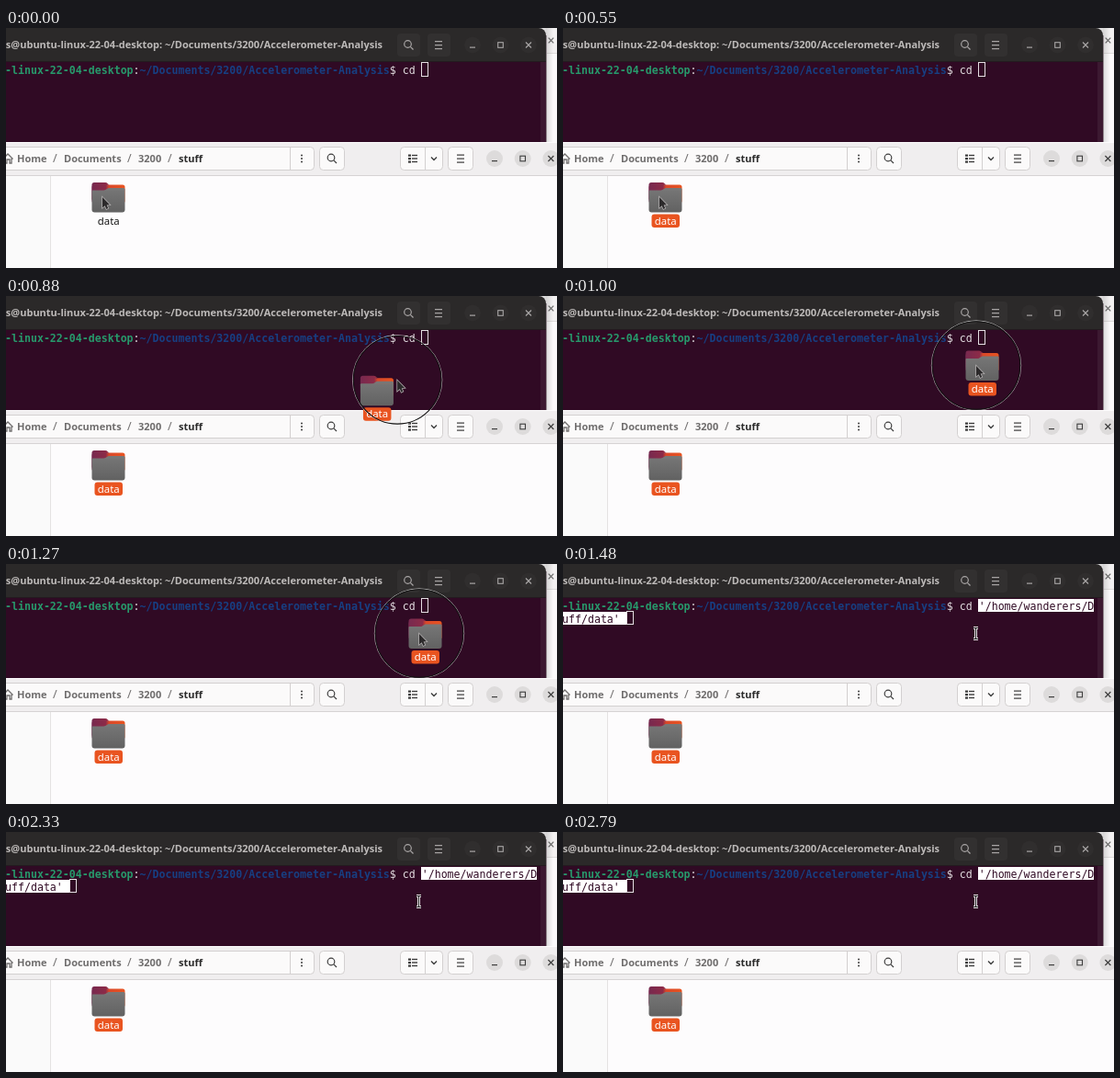
Write an HTML page with a canvas that moves like this. It is 600 by 261 pixels and loops after 2.82 s.

```html
<!DOCTYPE html>
<html lang="en">
<head>
<meta charset="utf-8">
<title>Drag a folder into the terminal</title>
<style>
html, body { margin: 0; width: 100%; height: 100%; overflow: hidden; background: #fff; }
canvas { display: block; width: 600px; height: 261px; }
</style>
</head>
<body>
<canvas id="stage" width="600" height="261"></canvas>
<script>
const ctx = document.getElementById('stage').getContext('2d');
const LOOP = 2820;
const UI = '"Noto Sans", "Open Sans", sans-serif';
const MONO = '11.6px "DejaVu Sans Mono", "Noto Sans Mono", monospace';
const CELL = 6.98;
const CLICK = 210, RELEASE = 420, PRESS = 578, DRAG = 630, DROP = 1480;
const LAG = 31;

function rect(x, y, w, h, fill) {
  ctx.fillStyle = fill;
  ctx.fillRect(x, y, w, h);
}

function box(x, y, w, h, r, fill, stroke) {
  ctx.beginPath();
  ctx.roundRect(x, y, w, h, r);
  if (fill) { ctx.fillStyle = fill; ctx.fill(); }
  if (stroke) { ctx.strokeStyle = stroke; ctx.lineWidth = 1; ctx.stroke(); }
}

function disc(x, y, r, fill) {
  ctx.beginPath();
  ctx.arc(x, y, r, 0, Math.PI * 2);
  ctx.fillStyle = fill;
  ctx.fill();
}

function circle(x, y, r, color, width) {
  ctx.beginPath();
  ctx.arc(x, y, r, 0, Math.PI * 2);
  ctx.strokeStyle = color;
  ctx.lineWidth = width;
  ctx.stroke();
}

function lines(color, width, ...paths) {
  ctx.strokeStyle = color;
  ctx.lineWidth = width;
  ctx.beginPath();
  for (const p of paths) {
    ctx.moveTo(p[0], p[1]);
    for (let i = 2; i < p.length; i += 2) ctx.lineTo(p[i], p[i + 1]);
  }
  ctx.stroke();
}

function shape(points, fill, stroke) {
  ctx.beginPath();
  for (let i = 0; i < points.length; i += 2) ctx.lineTo(points[i], points[i + 1]);
  ctx.closePath();
  if (stroke) { ctx.strokeStyle = stroke; ctx.lineWidth = 1.5; ctx.stroke(); }
  ctx.fillStyle = fill;
  ctx.fill();
}

function text(str, x, y, font, color, align = 'left') {
  ctx.font = font;
  ctx.fillStyle = color;
  ctx.textAlign = align;
  ctx.fillText(str, x, y);
}

function lens(x, y, color) {
  circle(x - 1, y - 1, 3.8, color, 1.2);
  lines(color, 1.2, [x + 1.8, y + 1.8, x + 5, y + 5]);
}

function burger(x, y, color) {
  for (const d of [-4, 0, 4]) rect(x - 4, y + d - 0.5, 8, 1.2, color);
}

function cross(x, y, r, color) {
  lines(color, 1.2, [x - r, y - r, x + r, y + r], [x + r, y - r, x - r, y + r]);
}

function windowButtons(x, y, step, fill, color) {
  for (let i = 0; i < 3; i++) disc(x + i * step, y, 9, fill);
  rect(x - 3, y + 2, 6, 1.2, color);
  ctx.strokeStyle = color;
  ctx.lineWidth = 1.1;
  ctx.strokeRect(x + step - 2.8, y - 2.8, 5.6, 5.6);
  cross(x + step * 2, y, 3, color);
}

function backdrop() {
  rect(0, 0, 600, 261, '#fbfafb');
  rect(588, 0, 12, 27, '#f3f1f2');
  rect(588, 27, 12, 1, '#dedcdc');
  cross(593.5, 13.5, 2.8, '#666');
  const shade = ctx.createLinearGradient(588, 0, 596, 0);
  shade.addColorStop(0, 'rgba(0,0,0,.13)');
  shade.addColorStop(1, 'rgba(0,0,0,0)');
  rect(580, 0, 16, 125, shade);
}

function terminal(pasted) {
  rect(0, 30, 588, 96, '#300a24');
  rect(582, 37, 6, 88, '#3c1931');
  box(-10, 0, 598, 36, [0, 8, 0, 0], '#2b2929');
  rect(0, 36, 588, 1, '#231b1f');
  rect(588, 8, 1, 116, '#8f858b');
  text('s@ubuntu-linux-22-04-desktop: ~/Documents/3200/Accelerometer-Analysis',
    410, 22, 'bold 11px ' + UI, '#bdbab9', 'right');
  box(426, 6, 25, 25, 4, '#323030');
  box(459, 6, 25, 25, 4, '#323030');
  const icon = '#a9a6a6';
  lens(438.5, 18.5, icon);
  burger(471, 18.5, icon);
  windowButtons(508, 18.5, 30.5, '#302e2e', icon);

  const put = (str, col, y, color, weight = '') =>
    text(str, -1 + col * CELL, y, weight + MONO, color);
  put('-linux-22-04-desktop', 0, 49.5, '#27996b', 'bold ');
  put(':', 20, 49.5, '#e4dfe2');
  put('~/Documents/3200/Accelerometer-Analysis', 21, 49.5, '#173f82', 'bold ');
  put('$ cd', 60, 49.5, '#e4dfe2');

  if (pasted) {
    rect(452, 38, 126, 14, '#fff');
    rect(0, 52, 69, 14, '#fff');
    put("'/home/wanderers/D", 65, 49.5, '#300a24');
    put("uff/data'", 0, 63.5, '#300a24');
  }
  ctx.strokeStyle = '#e4dfe2';
  ctx.lineWidth = 1;
  if (pasted) ctx.strokeRect(69.5, 51.5, 7, 14);
  else ctx.strokeRect(452.5, 37.5, 7, 15);
}

function files() {
  rect(0, 124, 600, 137, '#fdfcfd');
  rect(0, 125, 600, 35, '#f0eeef');
  rect(0, 160, 600, 1, '#d6d3d4');
  rect(0, 161, 48, 100, '#fafafa');
  rect(48, 161, 1, 100, '#e4e2e2');

  const line = '#d3d0d0', ink = '#3d3d3d', dim = '#6f6d6d', fill = '#fbfafa';
  box(-9.5, 129.5, 345, 25, 4, fill, line);
  rect(309, 130, 1, 24, line);
  box(341.5, 129.5, 27, 25, 4, fill, line);
  box(429.5, 129.5, 46, 25, 4, fill, line);
  rect(456, 130, 1, 24, line);
  box(481.5, 129.5, 27, 25, 4, fill, line);

  lines(dim, 1.3, [-3, 142, 2, 137, 7.5, 142.5],
    [-1, 142, -1, 147, 1, 147, 1, 143, 4, 143, 4, 147, 6, 147, 6, 142]);
  const bold = 'bold 11px ' + UI;
  text('Home', 12, 146, bold, dim);
  text('Documents', 63, 146, bold, dim);
  text('3200', 144, 146, bold, dim);
  text('stuff', 188, 146, bold, '#2b2b2b');
  for (const x of [51, 132, 176]) text('/', x, 146, '12.5px ' + UI, dim);

  for (const d of [-3.5, 0, 3.5]) {
    disc(322, 142 + d, 1, ink);
    rect(438, 141 + d, 3, 2.2, ink);
    rect(442, 141.3 + d, 6, 1.4, ink);
  }
  lens(355, 142, ink);
  lines(ink, 1.4, [463, 140.5, 466, 143.5, 469, 140.5]);
  burger(495, 142, ink);
  windowButtons(532, 142, 30.7, '#dddbdb', ink);
}

function folder(x, y, selected) {
  ctx.save();
  ctx.translate(x, y);
  const back = ctx.createLinearGradient(0, 0, 36, 0);
  back.addColorStop(0, '#77294f');
  back.addColorStop(0.42, '#8c2b48');
  back.addColorStop(0.52, '#d9482a');
  back.addColorStop(1, '#e95420');
  box(0, 0, 17, 20, 2.5, back);
  box(0, 2.5, 36, 20, 2.5, back);
  shape([14, 0.5, 16, 0.5, 19, 2.6, 14, 2.6], '#8c2b48');
  const front = ctx.createLinearGradient(0, 6, 0, 32);
  front.addColorStop(0, '#777');
  front.addColorStop(1, '#626262');
  box(0, 8.5, 36, 24, [1, 1, 3, 3], front);
  shape([13, 9, 18, 6, 35, 6, 36, 7, 36, 9], '#777');
  if (selected) box(3, 34.5, 30.5, 14.5, 3, '#e95420');
  text('data', 18.2, 45.7, '500 11.4px ' + UI, selected ? '#fff' : '#161616', 'center');
  ctx.restore();
}

function arrow(x, y) {
  ctx.save();
  ctx.translate(x, y);
  shape([0, 0, 0, 11.5, 2.7, 9.2, 4.4, 13, 6.2, 12, 4.6, 8.5, 8, 8.2], '#2c2a2b', '#b5b2b3');
  ctx.restore();
}

function ibeam(x, y) {
  const parts = [[x - 2.5, y - 6, x + 2.5, y - 6], [x, y - 6, x, y + 6], [x - 2.5, y + 6, x + 2.5, y + 6]];
  lines('#e8e4e6', 3, ...parts);
  lines('#222', 1, ...parts);
}

// A pale rim shows on dark areas, the inner dark rim on light ones.
function ring(x, y) {
  circle(x, y, 48.7, 'rgba(255,255,255,.6)', 1);
  circle(x, y, 47.8, '#111', 1.1);
}

function ease(t, start, end) {
  const u = Math.min(1, Math.max(0, (t - start) / (end - start)));
  return u * u * (3 - 2 * u);
}

function pointer(t) {
  return {
    x: 105 + 345 * ease(t, PRESS, 939),
    y: 184 - 108 * ease(t, 610, 967)
  };
}

function draw(t) {
  const dropped = t >= DROP;
  const p = pointer(t);
  backdrop();
  terminal(dropped);
  files();
  folder(93.5, 168, t >= CLICK);
  if (dropped) {
    ibeam(449.5, 75.5);
    return;
  }
  if (t >= DRAG) {
    const held = pointer(t - LAG);
    folder(held.x - 11.5, held.y - 16.5, true);
  }
  if ((t >= CLICK && t < RELEASE) || t >= PRESS) ring(p.x, p.y - 0.5);
  arrow(p.x, p.y);
}

const start = performance.now();
function tick() {
  draw((performance.now() - start) % LOOP);
  requestAnimationFrame(tick);
}
tick();
</script>
</body>
</html>
```
